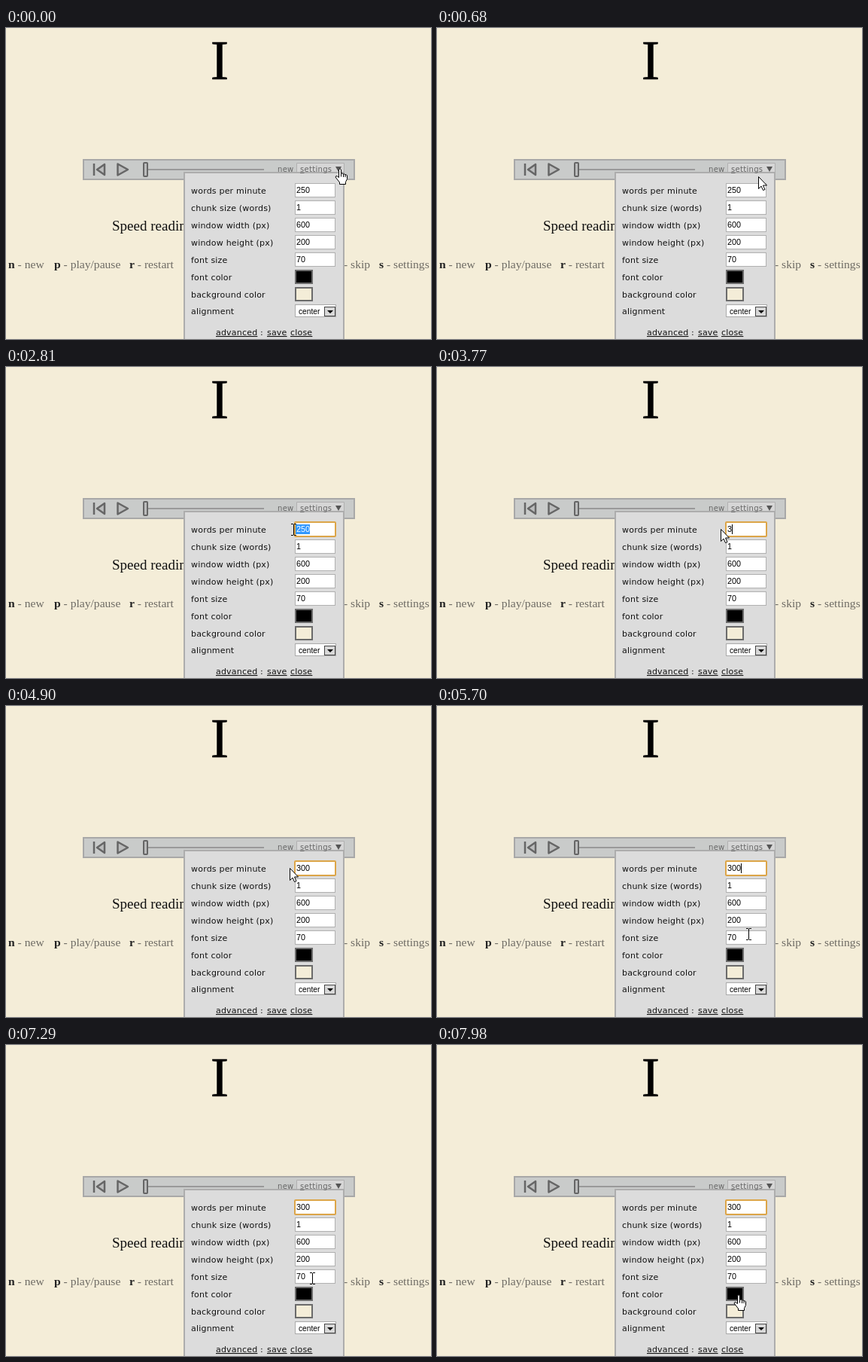
Recreate the animation shown at these times as an HTML page. Size 565 by 413 pixels, loop 8000 ms.

```html
<!DOCTYPE html>
<html lang="en">
<head>
<meta charset="utf-8">
<title>Speed reading settings</title>
<style>
  html, body { margin: 0; width: 100%; height: 100%; overflow: hidden; background: #f4edd8; }
  svg { display: block; }
  text { white-space: pre; }
  .serif { font-family: "Liberation Serif", serif; }
  .keys { font-size: 15.6px; fill: #6e6b64; }
  .keys tspan { font-weight: bold; fill: #222; }
  .label { font: 11px "DejaVu Sans", Verdana, sans-serif; letter-spacing: .2px; fill: #111; }
  .tab { font: 10px "DejaVu Sans", Verdana, sans-serif; letter-spacing: .3px; fill: #666; }
  .value { font: 10.8px "Liberation Sans", Arial, sans-serif; }
  .link { text-decoration: underline; }
  .icon { fill: #bbbcbc; stroke: #666; stroke-width: 2.5; stroke-linejoin: round; }
</style>
</head>
<body>
<svg width="565" height="413" viewBox="0 0 565 413">
  <text class="serif" x="284" y="68" font-size="73" text-anchor="middle" stroke="#000" stroke-width=".5">I</text>
  <text class="serif" x="141" y="269" font-size="19" fill="#111">Speed reading</text>
  <g class="serif keys">
    <text x="3" y="319"><tspan>n</tspan> - new</text>
    <text x="64" y="319"><tspan>p</tspan> - play/pause</text>
    <text x="164" y="319"><tspan>r</tspan> - restart</text>
    <text x="449" y="319">- skip</text>
    <text x="496" y="319"><tspan>s</tspan> - settings</text>
  </g>

  <rect x="103" y="175" width="360" height="26" fill="#c9cbca" stroke="#a8a8a8" stroke-width="2"/>
  <g class="icon">
    <path d="M117 180V196M131 181L121 188L131 195Z"/>
    <path d="M148.500 180.500L162 188L148.500 195.500Z"/>
    <path d="M189 188H343" stroke="#999" stroke-width="2"/>
    <rect x="183" y="179" width="5" height="18" rx="1" stroke-width="2"/>
  </g>
  <text class="tab" x="361" y="191">new</text>
  <path d="M386.500 193V179.500H449.500V193" fill="#d6d6d6" stroke="#b0b0b0"/>
  <rect x="237" y="192" width="212" height="230" fill="#dcdcdc" stroke="#adadad" stroke-width="2"/>
  <text class="tab" x="391" y="191"><tspan class="link">s</tspan>ettings</text>
  <path d="M438 184H446L442 191Z" fill="#555"/>

  <g id="form"></g>
  <rect x="385" y="322" width="22" height="17" stroke="#6b6b6b" stroke-width="2"/>
  <rect x="385" y="345" width="22" height="17" fill="#f4edd8" stroke="#6b6b6b" stroke-width="2"/>
  <rect x="384.500" y="367.500" width="54" height="16" fill="#fff" stroke="#aaa"/>
  <text class="value" x="389" y="380" style="font-size:10.2px">center</text>
  <rect x="423.500" y="370.500" width="14" height="12" fill="#d8d8d8" stroke="#444"/>
  <path d="M427 375H435L431 379Z"/>
  <text class="label" y="408"><tspan class="link" x="279">advanced</tspan><tspan x="338">:</tspan><tspan class="link" x="347">save</tspan><tspan class="link" x="378">close</tspan></text>

  <rect id="focus" x="384" y="206" width="54" height="19" rx="1" fill="none" stroke="#dca548" stroke-width="2"/>
  <rect id="selection" y="209" height="13" fill="#3399ff"/>
  <text class="value" x="386" y="219"><tspan id="plain"></tspan><tspan id="selected" fill="#fff"></tspan></text>
  <rect id="caret" y="209" width="1" height="13"/>

  <g id="cursor" stroke="#000" fill="#fff">
    <path id="arrow" d="M.5 .5V16.500L4 13L6.500 18.500L9 17.500L6.500 12H11.500Z"/>
    <path id="hand" stroke-linejoin="round" d="M5.500 12.500V2Q7-.5 8.500 2V7.500Q10 6 11.500 8Q13 7 14 9Q15.500 8 16.500 10V14.500L14.500 18.500V21.500H6.500V19L1 12Q1.500 9.500 3.500 11ZM8.500 7.500V11.500M11.500 8V12M14 9V12"/>
    <path id="beam" fill="none" d="M0 .5H3M4 .5H7M3.500 1V15M0 15.500H3M4 15.500H7"/>
  </g>
</svg>
<script>
const $ = id => document.getElementById(id);
const LOOP = 8000;

const labels = ["words per minute", "chunk size (words)", "window width (px)", "window height (px)",
  "font size", "font color", "background color", "alignment"];
const values = ["", "1", "600", "200", "70"];
$("form").innerHTML = labels.map((label, i) => {
  const y = i < 7 ? 206 + 23 * i : 366;
  const field = i < values.length
    ? `<rect x="384.5" y="${y + .5}" width="53" height="18" fill="#fff" stroke="#b0b0b0"/>
       <text class="value" x="386" y="${y + 13}">${values[i]}</text>` : "";
  return `<text class="label" x="246" y="${y + 14}">${label}</text>${field}`;
}).join("");

// start time, shape, left, top
const pointer = [
  [0, "hand", 437, 186], [560, "arrow", 434, 192], [680, "arrow", 427, 197],
  [820, "arrow", 422, 203], [950, "beam", 418, 199], [1100, "beam", 416, 206],
  [1220, "beam", 414, 209], [2540, "beam", 404, 209], [2660, "beam", 394, 209],
  [2810, "beam", 379, 208], [2940, "beam", 376, 208], [3090, "arrow", 377, 215],
  [5150, "arrow", 381, 220], [5310, "beam", 397, 235], [5460, "beam", 410, 268],
  [5580, "beam", 417, 300], [5700, "beam", 411, 295], [5970, "beam", 417, 300],
  [6090, "beam", 414, 290], [6220, "beam", 408, 272], [6340, "beam", 405, 260],
  [6480, "beam", 404, 253], [7160, "beam", 404, 284], [7290, "beam", 404, 302],
  [7440, "beam", 403, 311], [7560, "arrow", 401, 320], [7710, "hand", 393, 324],
  [7850, "hand", 394, 328], [7980, "hand", 394, 331]
];
const typing = [[0, "250"], [3770, "3"], [4170, "30"], [4320, "300"]];
const selecting = [[0, 3], [2660, 2], [2810, 0], [3770, 3]];
const caretOn = [[2390, 2660], [3770, 4900], [5460, 5970], [6480, 7020], [7560, 7980]];

const at = (steps, t) => steps.findLast(step => step[0] <= t);
const show = (id, on) => $(id).setAttribute("visibility", on ? "visible" : "hidden");

function draw(t) {
  const [, shape, x, y] = at(pointer, t);
  $("cursor").setAttribute("transform", `translate(${x} ${y})`);
  for (const id of ["arrow", "hand", "beam"]) show(id, id === shape);

  const text = at(typing, t)[1], from = at(selecting, t)[1];
  $("plain").textContent = text.slice(0, from);
  $("selected").textContent = text.slice(from);
  const left = from ? 386 + 6 * from : 385;
  $("selection").setAttribute("x", left);
  $("selection").setAttribute("width", Math.max(0, 404 - left));

  $("caret").setAttribute("x", 386 + 6 * text.length);
  show("caret", caretOn.some(([on, off]) => t >= on && t < off));
  show("focus", t >= 2390);
}

const start = performance.now();
function tick() {
  draw((performance.now() - start) % LOOP);
  requestAnimationFrame(tick);
}
tick();
</script>
</body>
</html>
```
